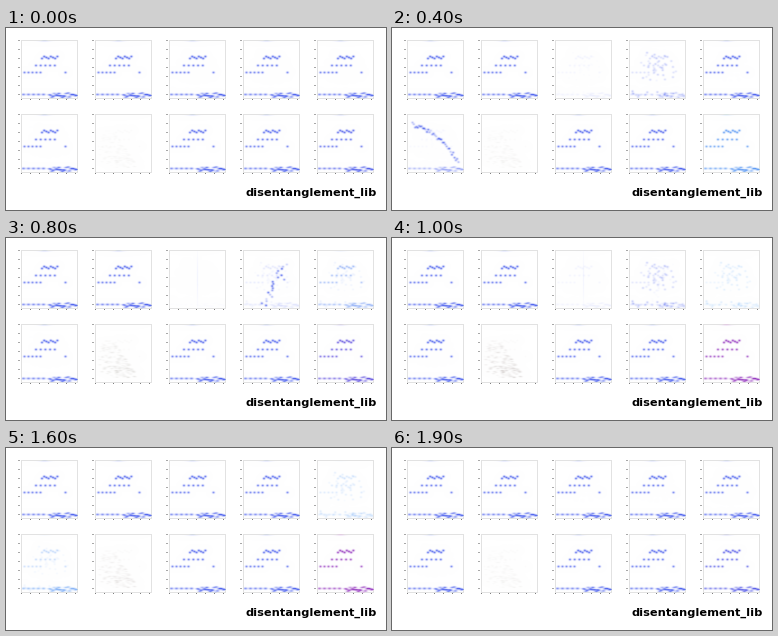
Animation of 380x182 px, one loop 2000 ms. Source, as a matplotlib script:

```python
import numpy as np
import matplotlib.pyplot as plt
from matplotlib.animation import FuncAnimation

W, H, DPI = 380, 182, 100
FRAMES, STEP = 20, 100
LOOP = FRAMES * STEP
PW, PH, PITCH = 57, 59, 74           # panel size and spacing in pixels

BLUE = np.array([84, 104, 238]) / 255
SKY = np.array([100, 170, 245]) / 255
VIOLET = np.array([150, 62, 196]) / 255
CRIMSON = np.array([196, 50, 100]) / 255
GREY = np.array([150, 146, 138]) / 255
PINK = np.array([196, 124, 156]) / 255

rng = np.random.default_rng(4)
yy, xx = np.mgrid[0:PH, 0:PW]


def dots(xs, ys, level, rx=1.3, ry=1.1):
    xs, ys, level, rx = np.broadcast_arrays(xs, ys, level, rx)
    total = sum(a * np.exp(-((xx - x) / r) ** 2 - ((yy - y) / ry) ** 2)
                for x, y, a, r in zip(xs, ys, level, rx))
    return np.minimum(total, 1)


def pulse(t, center, width, power=6):
    """Bump around one moment of the loop, flat-topped for a high power."""
    d = (t - center + LOOP / 2) % LOOP - LOOP / 2
    return np.exp(-abs(d / width) ** power)


def mix(a, b, f):
    return a + (b - a) * np.clip(f, 0, 1)


# Three rows of sprites, and the ground with rubble on its right half
i = np.arange(8)
upper = (dots(20.5 + 2.2 * i, 16 + (i + 2) % 3, .8)
         + dots(14.5 + 4.7 * i[:5], 25, .75)
         + dots(np.r_[3 + 4 * i[:5], 44], 32, .7)
         + dots([23], 0, .25, 6))
rubble = np.linspace(28, 55, 24)
lower = (dots(2 + 5 * i[:5], 54, .65, 1.9)
         + dots(rubble, 55 + rng.normal(0, 1.3, 24), rng.uniform(.25, .75, 24), 2, .9))

spread = (dots(rng.normal(27, 8, 40), rng.uniform(12, 42, 40), rng.uniform(.05, .35, 40))
          + dots(rng.uniform(2, 55, 30), rng.normal(54, 1.5, 30), rng.uniform(.1, .4, 30)))
seam = dots([28], 28, .06, .8, 25)

s = np.linspace(0, 1, 20)
diagonal = dots(19 + 22 * s + rng.normal(0, 2.8, 20), 55 - 41 * s, rng.uniform(.2, .8, 20))
s = np.linspace(0, 1, 36)
angle = s * np.pi / 2
rise = dots(2 + 53 * (1 - np.cos(angle)) + rng.normal(0, 1.8, 36),
            57 - 56 * np.sin(angle) + rng.normal(0, 1.8, 36), rng.uniform(.15, .7, 36), 1.4)
fall = dots(5 + 46 * s, 11 + 36 * s ** 1.8 + rng.normal(0, 1.2, 36),
            rng.uniform(.2, .7, 36))

# Short dashes in a triangle that widens and darkens downwards
depth = rng.uniform(0, 1, 190) ** .7
grain = dots(3 + (14 + 26 * depth) * rng.uniform(0, 1, 190) ** .7, 15 + 38 * depth,
             rng.uniform(.02, .13, 190) * (.5 + depth), 1.8, .8)

# Panel: moments when it dissolves (center, width, loss of rows, loss of ground)
FADES = {
    2: [(700, 460, 1, .98)],
    3: [(720, 470, .85, .85)],
    4: [(1250, 480, .88, .9)],
    5: [(400, 250, .95, .45), (1450, 270, .65, .3)],
}
SCATTER = {2: .06, 3: .8, 4: .5, 5: .2}
SHAPES = {3: (diagonal, BLUE, 800, 170), 4: (rise, SKY, 1300, 200), 5: (fall, BLUE, 400, 220)}


def tint(k, t):
    if k == 4:
        return mix(BLUE, SKY, pulse(t, 1250, 480))
    if k == 5:
        return mix(BLUE, SKY, .8 * pulse(t, 1450, 270))
    if k == 9:
        warm = 2 * pulse(t, 1300, 370, 2)
        cool = mix(BLUE, SKY, .8 * pulse(t, 400, 300))
        return mix(mix(cool, VIOLET, warm), CRIMSON, warm - 1)
    return BLUE


def texture_panel(t):
    ink = (.2 + .8 * pulse(t, 1150, 500, 2)) * grain + .04 * upper
    color = mix(GREY, PINK, pulse(t, 1300, 200, 2))
    return 1 - ink[..., None] * (1 - color)


def panel(k, t):
    if k == 6:
        return texture_panel(t)
    rows = ground = 1
    gone = 0
    for center, width, row_loss, ground_loss in FADES.get(k, []):
        f = pulse(t, center, width)
        rows, ground, gone = rows - row_loss * f, ground - ground_loss * f, gone + f
    shape, tone, center, width = SHAPES.get(k, (seam, BLUE, 800, 300))
    show = pulse(t, center, width) if k in FADES else 0
    ink = rows * upper + ground * lower + SCATTER.get(k, 0) * gone * (1 - .8 * show) * spread
    return (1 - np.minimum(ink, 1)[..., None] * (1 - tint(k, t))
            - show * shape[..., None] * (1 - tone))


def draw_axes(img, x, y):
    for line in (img[y, x:x + PW], img[y + PH - 1, x:x + PW],
                 img[y:y + PH, x], img[y:y + PH, x + PW - 1]):
        np.minimum(line, .89, out=line)
    for n in range(7):
        d = round(n * 9.06)
        img[y + d, x - 3:x - 1] = .66
        img[y + PH, x + d] = .5


def stage(frame):
    img = np.ones((H, W, 3))
    for k in range(10):
        x, y = 15 + PITCH * (k % 5), 12 + PITCH * (k // 5)
        img[y:y + PH, x:x + PW] = np.clip(panel(k, frame * STEP), 0, 1)
        draw_axes(img, x, y)
    return img


fig = plt.figure(figsize=(W / DPI, H / DPI), dpi=DPI, facecolor="white")
ax = fig.add_axes([0, 0, 1, 1])
ax.set_axis_off()
view = ax.imshow(stage(0), extent=(0, W, H, 0), interpolation="nearest", aspect="auto")
ax.text(370.5, 168, "disentanglement_lib", ha="right", va="baseline", color="black",
        family="DejaVu Sans", weight="bold", fontsize=11.4 * 72 / DPI)


def update(frame):
    view.set_data(stage(frame))
    return [view]


anim = FuncAnimation(fig, update, frames=FRAMES, interval=STEP,
                     init_func=lambda: update(0), repeat=True, repeat_delay=0)
plt.show()
```
